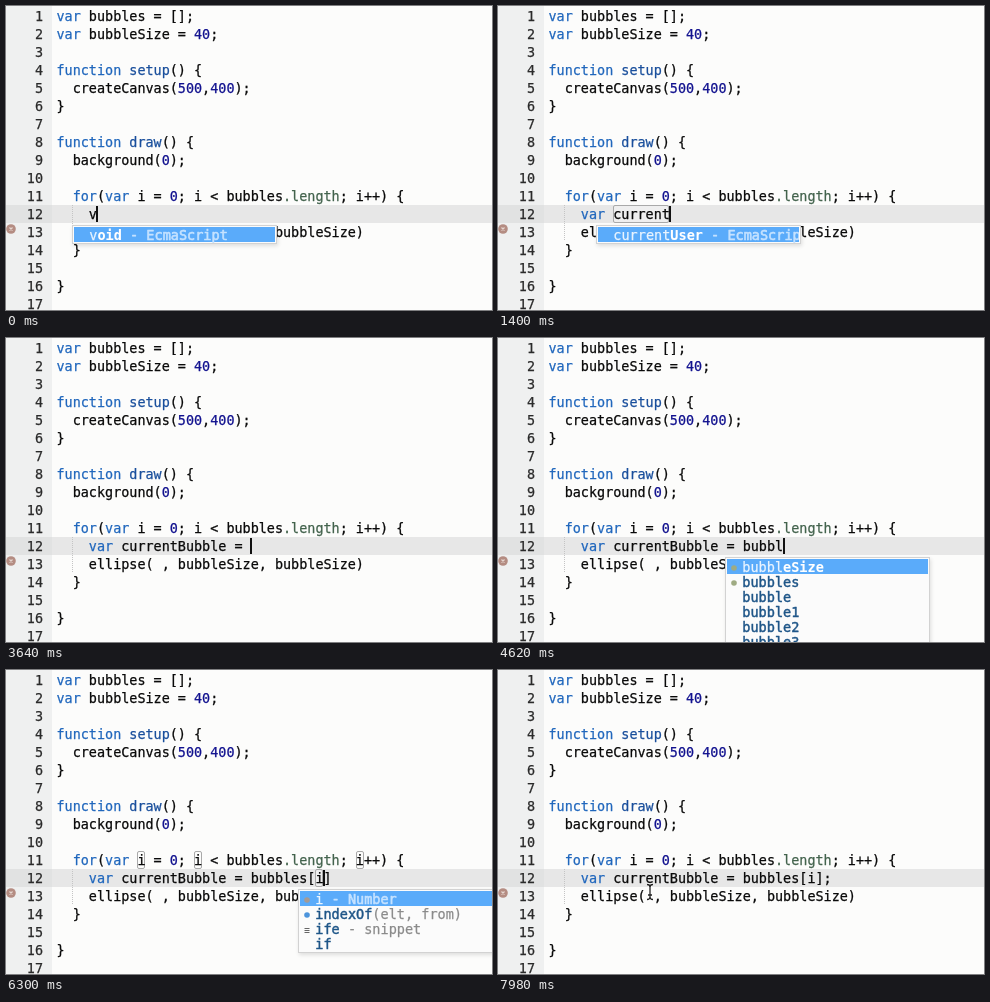
These frames come from a looping animation (486x304 px, 8000 ms). An HTML page with a canvas:

```html
<!DOCTYPE html>
<html>
<head>
<meta charset="utf-8">
<style>
html, body { margin: 0; width: 100%; height: 100%; overflow: hidden; background: #fcfcfb; }
canvas { display: block; }
</style>
</head>
<body>
<canvas id="stage" width="486" height="304"></canvas>
<script>
const ctx = document.getElementById('stage').getContext('2d');
const W = 486, H = 304, LOOP = 8000;
const LEFT = 50.5, CHAR = 8.09, ROW = 18;
const FAMILY = '"DejaVu Sans Mono", "Liberation Mono", monospace';
const FONT = '13.44px ' + FAMILY;
const POPUP_FONT = '13.54px ' + FAMILY, POPUP_CHAR = 8.15;

const LINES = [
  'var bubbles = [];',
  'var bubbleSize = 40;',
  '',
  'function setup() {',
  '  createCanvas(500,400);',
  '}',
  '',
  'function draw() {',
  '  background(0);',
  '',
  '  for(var i = 0; i < bubbles.length; i++) {',
  '',
  '    ellipse( , bubbleSize, bubbleSize)',
  '  }',
  '',
  '}',
  ''
];

// Text of line 12 from each moment on; a bar marks a caret inside the text.
const EDITS = [
  [0, 'v'], [140, 'va'], [280, 'var'], [420, 'var '], [560, 'var c'],
  [700, 'var cu'], [840, 'var cur'], [980, 'var curr'], [1120, 'var curre'],
  [1260, 'var curren'], [1400, 'var current'], [1820, 'var currentB'],
  [1960, 'var currentBu'], [2240, 'var currentBub'], [2520, 'var currentBubb'],
  [2660, 'var currentBubble'], [2940, 'var currentBubble '],
  [3640, 'var currentBubble = '], [3920, 'var currentBubble = b'],
  [4200, 'var currentBubble = bu'], [4340, 'var currentBubble = bub'],
  [4480, 'var currentBubble = bubb'], [4620, 'var currentBubble = bubbl'],
  [4760, 'var currentBubble = bubble'], [4900, 'var currentBubble = bubbles'],
  [5460, 'var currentBubble = bubbles[|]'], [6020, 'var currentBubble = bubbles[i|]'],
  [6440, 'var currentBubble = bubbles[i]'], [6580, 'var currentBubble = bubbles[i];']
];

// Suggestion rows: [name, grey tail, icon]
const USER = ['currentUser', ' - EcmaScript', ''];
const BUBBLE_ROWS = [
  ['bubbleSize', '', 'olive'], ['bubbles', '', 'olive'],
  ['bubble', '', ''], ['bubble1', '', ''], ['bubble2', '', ''], ['bubble3', '', '']
];
const METHOD_ROWS = [
  ['bubbles', '', 'tan'],
  ['bubbles.concat', '(other)', 'blue'],
  ['bubbles.every', '(test, context)', 'blue'],
  ['bubbles.filter', '(test, context)', 'blue'],
  ['bubbles.forEach', '(f, context)', 'blue'],
  ['bubbles.indexOf', '(elt, from)', 'blue']
];
const INDEX_ROWS = [
  ['i', ' - Number', 'tan'], ['indexOf', '(elt, from)', 'blue'],
  ['ife', ' - snippet', 'lines'], ['if', '', '']
];

// [start, end, column, rows]
const POPUPS = [
  [0, 140, 4, [['void', ' - EcmaScript', '']]],
  [560, 700, 8, [['createCanvas', '', ''], USER, ['cursor', '', ''], ['ceil', '', ''],
    ['color', '', ''], ['cos', '', '']]],
  [700, 980, 8, [USER, ['cursor', '', '']]],
  [980, 1820, 8, [USER]],
  [3920, 4900, 24, BUBBLE_ROWS],
  [4900, 5180, 24, BUBBLE_ROWS.slice(1)],
  [5180, 5460, 24, METHOD_ROWS],
  [6020, 6440, 32, INDEX_ROWS]
];

// [start, end, length, [line, column] ...]
const MARKS = [
  [1400, 1820, 7, [12, 8]],
  [5040, 5600, 7, [1, 4], [11, 21], [12, 24]],
  [6300, 6580, 1, [11, 10], [11, 17], [11, 37], [12, 32]]
];

const POINTER = [[7700, 196, 262], [7840, 166, 236], [7980, 152, 222]];
const ICONS = { olive: '#9fab83', tan: '#a59a94', blue: '#4c94dc' };

const colX = col => LEFT + col * CHAR;
const rowY = line => 1 + (line - 1) * ROW;
const active = (list, t) => list.find(e => t >= e[0] && t < e[1]);
const latest = (list, t) => list.filter(e => t >= e[0]).pop();

function rect(x, y, w, h, color) {
  ctx.fillStyle = color;
  ctx.fillRect(x, y, w, h);
}

// A hairline outline gives the glyphs their slightly heavy look.
function text(str, x, y, color, weight = 0.25) {
  ctx.fillStyle = ctx.strokeStyle = color;
  ctx.lineWidth = weight;
  ctx.fillText(str, x, y);
  ctx.strokeText(str, x, y);
}

function tokenColor(token) {
  if (/^(var|function|for)$/.test(token)) return '#2067bd';
  if (/^(setup|draw)$/.test(token)) return '#1a4f9c';
  if (/^\d+$/.test(token)) return '#12128f';
  if (token === '.length') return '#43634d';
  return '#0a0a0a';
}

function drawCode(str, line) {
  for (const m of str.matchAll(/\.length|\w+|[^\w\s]/g)) {
    text(m[0], colX(m.index), rowY(line) + 14, tokenColor(m[0]));
  }
}

function drawGutter() {
  rect(0, 0, 46, H, '#eff0f0');
  rect(0, rowY(12), 46, ROW, '#e1e2e2');
  ctx.textAlign = 'right';
  for (let n = 1; n <= LINES.length; n++) text(n, 37, rowY(n) + 14, '#2a2a2a');
  ctx.textAlign = 'left';

  ctx.fillStyle = '#b48c82';
  ctx.beginPath();
  ctx.arc(5, 223, 4.8, 0, 7);
  ctx.fill();
  ctx.strokeStyle = '#e6d6d0';
  ctx.lineWidth = 1.2;
  ctx.beginPath();
  ctx.moveTo(3.5, 221.5);
  ctx.lineTo(6.5, 224.5);
  ctx.moveTo(6.5, 221.5);
  ctx.lineTo(3.5, 224.5);
  ctx.stroke();
}

function drawMarks(t) {
  const mark = active(MARKS, t);
  if (!mark) return;
  ctx.lineWidth = 1;
  ctx.strokeStyle = '#a9a9a9';
  for (const [line, col] of mark.slice(3)) {
    const x = Math.round(colX(col)) + 0.5, y = rowY(line) + 0.5;
    ctx.beginPath();
    ctx.roundRect(x, y, Math.floor(mark[2] * CHAR) - 1, ROW - 1, 1.5);
    ctx.fillStyle = line === 12 ? '#efefef' : '#fcfcfb';
    ctx.fill();
    ctx.stroke();
  }
}

function drawIcon(kind, x, y) {
  if (kind === 'lines') {
    for (let k = -2; k <= 2; k += 2) rect(x - 2.5, y + 1 + k, 5, 1, '#666');
  } else if (kind) {
    ctx.fillStyle = ICONS[kind];
    ctx.beginPath();
    ctx.arc(x, y + 1, 2.8, 0, 7);
    ctx.fill();
  }
}

function drawPopup(t, typed) {
  const popup = active(POPUPS, t);
  if (!popup) return;
  const [, , col, rows] = popup;
  const x = Math.round(colX(col) - 17.2), y = 219;
  const w = 205, h = rows.length * 15 + 4;

  ctx.save();
  ctx.shadowColor = 'rgba(0,0,0,.12)';
  ctx.shadowBlur = 4;
  ctx.shadowOffsetX = 1;
  ctx.shadowOffsetY = 2;
  rect(x, y, w, h, '#d2d2d2');
  ctx.restore();
  rect(x + 1, y + 1, w - 2, h - 2, '#fbfbfb');
  rect(x + 2, y + 2, w - 4, 15, '#5aabfa');

  ctx.save();
  ctx.beginPath();
  ctx.rect(x + 1, y + 1, w - 3, h - 2);
  ctx.clip();
  rows.forEach(([name, tail, icon], i) => {
    const base = y + 15 + i * 15, start = x + 17.3;
    const at = n => start + n * POPUP_CHAR;
    ctx.font = POPUP_FONT;
    drawIcon(icon, x + 9, base - 5);
    if (i) {
      text(name, start, base, '#1f5688', 0.45);
      text(tail, at(name.length), base, '#8b8b8b');
    } else {
      text(name.slice(0, typed), start, base, '#e9f4ff');
      text(tail, at(name.length), base, '#c5e2ff', 0.6);
      ctx.font = 'bold ' + POPUP_FONT;
      text(name.slice(typed), at(typed), base, '#fff', 0.1);
    }
  });
  ctx.restore();
}

function drawPointer(t) {
  const at = latest(POINTER, t);
  if (!at) return;
  const [, x, y] = at;
  ctx.beginPath();
  for (const side of [-1, 1]) {
    const end = y + side * 7.5, neck = y + side * 5;
    ctx.moveTo(x - 3, end);
    ctx.quadraticCurveTo(x, end, x, neck);
    ctx.quadraticCurveTo(x, end, x + 3, end);
  }
  ctx.moveTo(x, y - 5);
  ctx.lineTo(x, y + 5);
  ctx.moveTo(x - 2, y + 3);
  ctx.lineTo(x + 2, y + 3);
  for (const [width, color] of [[3, 'rgba(255,255,255,.8)'], [1.3, '#222']]) {
    ctx.lineWidth = width;
    ctx.strokeStyle = color;
    ctx.stroke();
  }
}

function draw(t) {
  const typed = latest(EDITS, t)[1];
  const before = typed.split('|')[0];
  const caret = 4 + before.length;

  rect(0, 0, W, H, '#fcfcfb');
  ctx.font = FONT;
  ctx.lineJoin = 'round';
  drawGutter();
  rect(46, rowY(12), W - 46, ROW, '#e7e7e7');
  for (let y = rowY(12); y < rowY(14); y += 2) rect(66, y, 1, 1, '#c4c4c4');
  drawMarks(t);
  LINES.forEach((str, i) => drawCode(str, i + 1));
  drawCode('    ' + typed.replace('|', ''), 12);
  if (t < 7000) rect(Math.floor(colX(caret)), rowY(12) + 1, 2, 16, '#111');
  drawPopup(t, before.match(/\w*$/)[0].length);
  drawPointer(t);
}

function tick() {
  draw(performance.now() % LOOP);
  requestAnimationFrame(tick);
}
tick();
</script>
</body>
</html>
```
